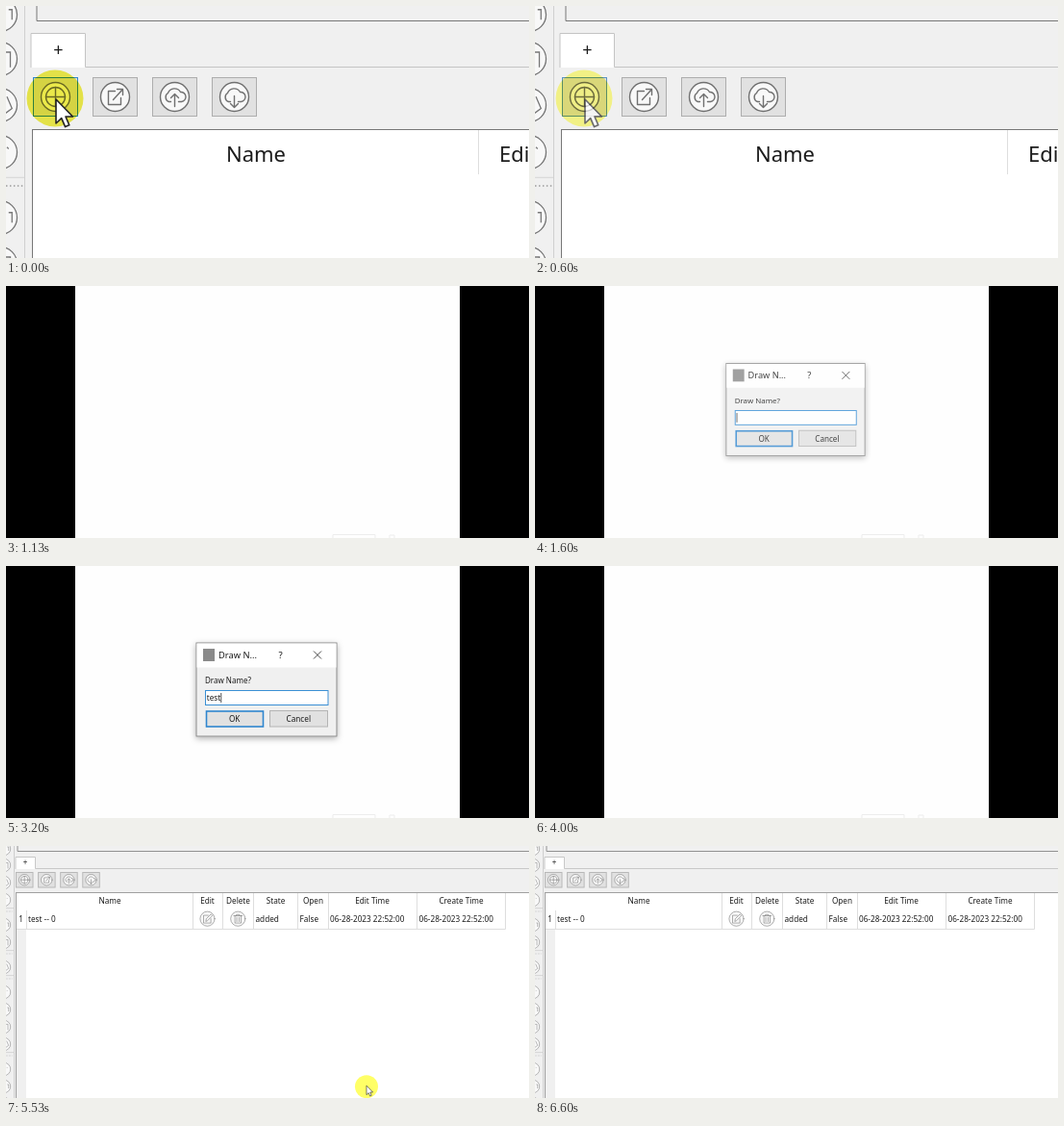
Recreate the animation shown at these times as an HTML page. Size 544x262 px, loop 6870 ms.

```html
<!DOCTYPE html>
<html lang="en">
<head>
<meta charset="utf-8">
<title>Creating a new drawing</title>
<style>
  html, body { margin: 0; height: 100%; overflow: hidden; background: #f0f0f0; }
  svg { display: block; width: 100vw; height: 100vh; }
  text { font-family: "Noto Sans", "Open Sans", sans-serif; fill: #1c1c1c; }
  .mid { text-anchor: middle; }
  .icon { fill: none; stroke: #707070; stroke-width: 1.4; stroke-linecap: round; stroke-linejoin: round; }
  .disc { fill: #f8f8f8; }
</style>
</head>
<body>
<svg id="stage" viewBox="0 0 544 262">
  <defs>
    <filter id="shadow" x="-20%" y="-20%" width="140%" height="150%">
      <feDropShadow dx="0" dy="2" stdDeviation="3" flood-opacity=".3"/>
    </filter>
    <path id="arrow" d="M0 0V25L5.7 19.6 9.6 28.6 13.8 26.8 10 18H17.5Z"
          fill="#fff" stroke="#222" stroke-width="1.6" stroke-linejoin="round"/>
    <g id="target" class="icon">
      <circle class="disc" r="15"/><circle r="10"/><path d="M-10 0H10M0-10V10"/>
    </g>
    <g id="export" class="icon">
      <circle class="disc" r="15"/><path d="M0-6H-7V8H6V1M-2 3 8-8M2-8H8V-2"/>
    </g>
    <g id="cloud" class="icon">
      <circle class="disc" r="15"/>
      <path d="M-4 5H-6A5 5 0 0 1-7-4A7.2 7.2 0 0 1 6-5A5 5 0 0 1 7 5H4"/>
    </g>
    <g id="upload" class="icon"><use href="#cloud"/><path d="M0 10V-3M-4 1 0-3 4 1"/></g>
    <g id="download" class="icon"><use href="#cloud"/><path d="M0-1V11M-4 7 0 11 4 7"/></g>
    <g id="edit" class="icon">
      <circle class="disc" r="19"/><path d="M2-9H-10V11H9V0M-4 6-3 0 9-12 13-8 1 4Z"/>
    </g>
    <g id="trash" class="icon">
      <circle class="disc" r="19"/><path d="M-11-8H11M-4-8V-11H4V-8M-8-8V11H8V-8M-3-4V7M3-4V7"/>
    </g>
  </defs>

  <g id="closeup"></g>

  <g id="prompt">
    <rect width="544" height="262"/>
    <rect x="72" width="400" height="262" fill="#fefefe"/>
    <path d="M340 262V258.5H384V262M399 262V259H404V262" fill="none" stroke="#ededed"/>
    <g id="dialog">
      <rect x="198" y="80" width="146" height="97" fill="#f0f0f0" stroke="#8a8a8a" filter="url(#shadow)"/>
      <rect x="198.5" y="80.5" width="145" height="25" fill="#fff"/>
      <rect x="205" y="86" width="12" height="13" fill="#8b8b8b"/>
      <text x="221" y="96" font-size="9.3">Draw N...</text>
      <text class="mid" x="285.5" y="96" font-size="9.6">?</text>
      <path d="M320 88.5 328 96.5M328 88.5 320 96.5" stroke="#333" stroke-width=".9"/>
      <text x="207" y="122" font-size="8">Draw Name?</text>
      <rect x="207.5" y="129.5" width="127.5" height="15" fill="#fff" stroke="#3a8fd4"/>
      <text id="typed" x="208.8" y="140" font-size="8.2"></text>
      <path id="caret" d="M0 132V142" stroke="#222" stroke-width=".8"/>
      <rect x="208.5" y="151" width="59" height="16" fill="#e1e1e1" stroke="#2f86cf" stroke-width="1.6"/>
      <rect x="274.5" y="150.5" width="60" height="16.5" fill="#e1e1e1" stroke="#b4b4b4"/>
      <text class="mid" x="237.7" y="162" font-size="8.2">OK</text>
      <text class="mid" x="304.3" y="162" font-size="8.2">Cancel</text>
    </g>
  </g>

  <g id="table"></g>
</svg>
<script>
const LOOP = 6870;
const $ = id => document.getElementById(id);
const clamp = v => Math.max(0, Math.min(1, v));

const icon = (name, x, y, scale = 1) =>
  `<use href="#${name}" transform="translate(${x} ${y}) scale(${scale})"/>`;
const text = (label, x, y, size, cls = '') =>
  `<text class="${cls}" x="${x}" y="${y}" font-size="${size}">${label}</text>`;
const box = (x, y, w, h, fill, stroke = 'none') =>
  `<rect x="${x}" y="${y}" width="${w}" height="${h}" fill="${fill}" stroke="${stroke}"/>`;
const line = (d, color) => `<path d="${d}" fill="none" stroke="${color}"/>`;

// Round tools clipped by the left edge, with dotted group separators.
function toolbar(x, r, edge, tools, separators) {
  const marks = ['M.5 -.3H.7V.3', 'M.3 -.4H.6V.5', 'M.4 -.5 .7 .2 .3 .5', 'M.4 -.3 .5 -.2'];
  return line(`M${edge} 0V262`, '#cfcfcf') +
    tools.map((y, i) => `<g transform="translate(${x} ${y}) scale(${r})" fill="none" stroke="#777" stroke-width=".075">
      <circle class="disc" r="1"/><path d="${marks[i % 4]}"/></g>`).join('') +
    separators.map(y => line(`M0 ${y - r / 2}H${edge}`, '#d4d4d4') +
      `<path d="M0 ${y}H${edge - 2}" stroke="#999" stroke-width="${r / 12}" stroke-dasharray="${r / 12} ${r / 7}"/>`).join('');
}

const buttons = ['target', 'export', 'upload', 'download'];

$('closeup').innerHTML =
  box(0, 0, 544, 262, '#f0f0f0') +
  toolbar(-6, 17.5, 19.5, [9, 55, 103, 152, 220, 268], [187]) +
  line('M32 0V15.5H544', '#777') +
  box(26, 28, 57, 36, '#fff') +
  line('M26 64V28.5H82.5V63.5H544', '#c4c4c4') +
  text('+', 54.5, 52, 18, 'mid') +
  buttons.map((name, i) =>
    box(28.5 + 62 * i, 74.5, 46, 40, '#e1e1e1', '#adadad') + icon(name, 51.5 + 62 * i, 94.5)).join('') +
  box(27.5, 128.5, 530, 150, '#fff', '#777') +
  line('M491.5 129V175', '#dedede') +
  text('Name', 260, 161.5, 22, 'mid') + text('Edi', 513, 161.5, 22) +
  `<g id="press">
    ${box(28.5, 74.5, 46, 40, '#e1e1e1', '#2f86cf')}${icon('target', 51.5, 94.5)}
    <circle cx="51" cy="96" r="29.5" fill="#f2f04c" style="mix-blend-mode:multiply"/>
    <use href="#arrow" x="52" y="97"/>
  </g>`;

const headers = [['Name', 108], ['Edit', 209.5], ['Delete', 241.5], ['State', 280.5],
  ['Open', 319.5], ['Edit Time', 381], ['Create Time', 473.5]];
const cells = [['1', 13.3], ['test -- 0', 23], ['added', 259.5], ['False', 305.5],
  ['06-28-2023 22:52:00', 337], ['06-28-2023 22:52:00', 429.5]];
const columnEdges = [194.5, 225.5, 257.5, 303.5, 335.5, 427.5, 519.5];

$('table').innerHTML =
  box(0, 0, 544, 262, '#f0f0f0') +
  toolbar(-2, 6.7, 8.5, [3, 20, 38, 56, 82, 100, 126, 152, 170, 188, 206, 232, 250, 268], [68, 112, 138, 218]) +
  line('M12 0V5.5H544', '#909090') +
  box(10, 11, 20, 13, '#fff') +
  line('M10 24V11.5H30.5V23.5H544', '#c8c8c8') +
  text('+', 20, 20, 8, 'mid') +
  buttons.map((name, i) =>
    box(10.5 + 23.1 * i, 27.5, 17.5, 15.5, '#e1e1e1', '#b8b8b8') + icon(name, 19.2 + 23.1 * i, 35.2, .38)).join('') +
  box(10.5, 48.5, 550, 230, '#fff', '#a0a0a0') +
  box(11, 87, 10, 180, '#f0f0f0') +
  line(columnEdges.map(x => `M${x} 49V86.5`).join('') + 'M21.5 67V86.5M11 86.5H519.5', '#dedede') +
  headers.map(([label, x]) => text(label, x, 60, 8.2, 'mid')).join('') +
  cells.map(([label, x]) => text(label, x, 79, 8.2)).join('') +
  icon('edit', 209.5, 75.7, .4) + icon('trash', 241.3, 75.7, .4) +
  `<g id="pointer"><circle r="12" fill="#ffff66"/><use href="#arrow" transform="translate(0 -1) scale(.38)"/></g>`;

const keyTimes = [2470, 2670, 2870, 3000];
const show = (id, on) => $(id).style.display = on ? '' : 'none';

function draw(t) {
  show('closeup', t < 1130);
  show('prompt', t >= 1130 && t < 4200);
  show('table', t >= 4200);

  $('press').style.opacity = 1 - clamp((t - 440) / 460);

  // The dialog fades and grows in, then fades and shrinks away.
  const open = t < 1530 ? 0 : clamp((t - 1480) / 150) * (1 - clamp((t - 3750) / 230));
  $('dialog').style.opacity = open;
  $('dialog').setAttribute('transform', `translate(271 128.5) scale(${.94 + .06 * open}) translate(-271 -128.5)`);
  const typed = 'test'.slice(0, keyTimes.filter(k => t >= k).length);
  $('typed').textContent = typed;
  const width = typed && t < 4200 && t >= 1130 ? $('typed').getComputedTextLength() : 0;
  $('caret').setAttribute('transform', `translate(${209.3 + width} 0)`);

  const leave = clamp((t - 5480) / 250);
  const [x, y] = t < 5270 ? [276, 198] : [366 + 44 * leave, 241 + 45 * leave];
  $('pointer').setAttribute('transform', `translate(${x} ${y})`);
}

const start = performance.now();
function frame() {
  draw((performance.now() - start) % LOOP);
  requestAnimationFrame(frame);
}
frame();
</script>
</body>
</html>
```
